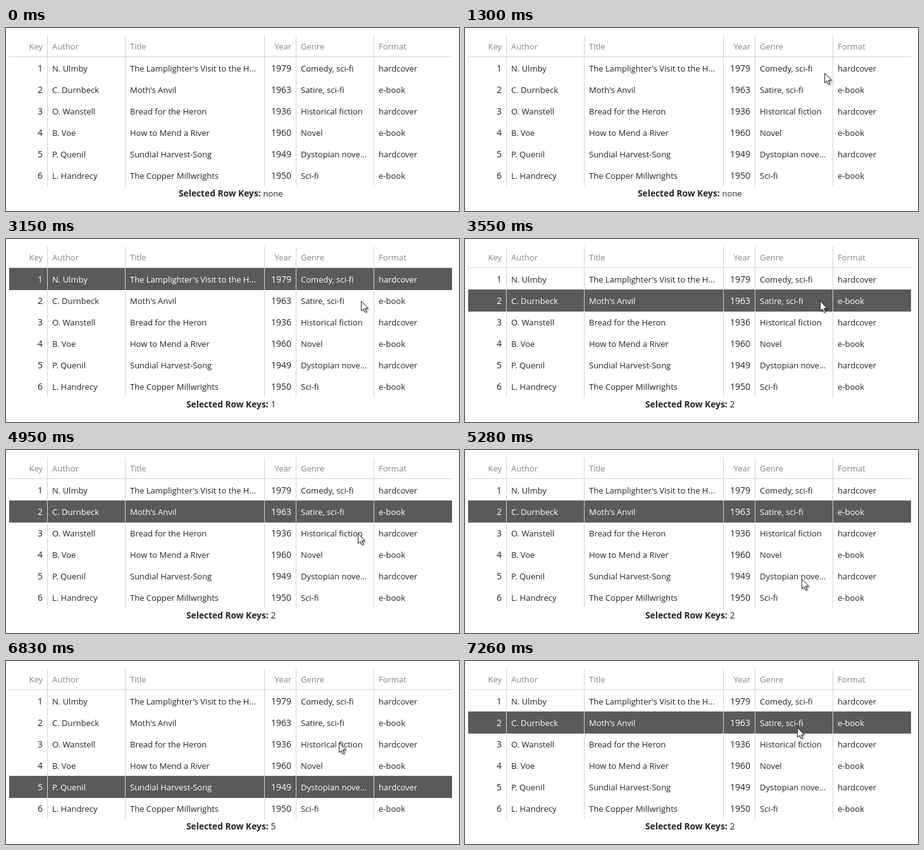
Animation, 716 px wide and 290 px high, one loop 8 s. Source, as an HTML page with a canvas:

```html
<!DOCTYPE html>
<html lang="en">
<head>
<meta charset="utf-8">
<title>Row selection</title>
<style>
  html, body { margin: 0; width: 100%; height: 100%; overflow: hidden; background: #fff; }
  canvas { display: block; width: 716px; height: 290px; }
</style>
</head>
<body>
<canvas id="stage" width="716" height="290"></canvas>
<script>
const ctx = document.getElementById('stage').getContext('2d');
const LOOP = 8000;
const STEP = 30;
const FAMILY = '"Open Sans", "Noto Sans", sans-serif';
const INK = '#222';
const HEAD = '#858589';
const LINE = '#d0d5d3';
const SELECTED = '#5a5a5a';

const TABLE = { left: 5, right: 705, top: 12, headLine: 45, rows: 46, pitch: 34, bottom: 251 };
const DIVIDERS = [65, 188, 408, 458, 581];
const COLUMNS = [
  { name: 'Key', x: 58, align: 'right' },
  { name: 'Author', x: 73 },
  { name: 'Title', x: 196 },
  { name: 'Year', x: 451, align: 'right' },
  { name: 'Genre', x: 466 },
  { name: 'Format', x: 589 }
];
const BOOKS = [
  ['1', 'N. Ulmby', "The Lamplighter's Visit to the H...", '1979', 'Comedy, sci-fi', 'hardcover'],
  ['2', 'C. Durnbeck', "Moth's Anvil", '1963', 'Satire, sci-fi', 'e-book'],
  ['3', 'O. Wanstell', 'Bread for the Heron', '1936', 'Historical fiction', 'hardcover'],
  ['4', 'B. Voe', 'How to Mend a River', '1960', 'Novel', 'e-book'],
  ['5', 'P. Quenil', 'Sundial Harvest-Song', '1949', 'Dystopian nove...', 'hardcover'],
  ['6', 'L. Handrecy', 'The Copper Millwrights', '1950', 'Sci-fi', 'e-book']
];

// [time, selected key]
const CLICKS = [[1760, 1], [3550, 2], [5640, 5], [7260, 2]];

const linear = p => p;
const easeIn = p => p * p;
const easeOut = p => 1 - (1 - p) ** 1.5;
const smooth = p => p * p * (3 - 2 * p);

// Pointer moves: start, end, from, to, easing
const MOVES = [
  [1030, 1300, [683, 93], [568, 71], easeOut],
  [2560, 2590, [568, 71], [567, 72], linear],
  [2590, 2620, [567, 72], [566, 75], linear],
  [2790, 3150, [566, 75], [561, 98], smooth],
  [4420, 4950, [561, 98], [556, 132], easeIn],
  [4950, 5250, [556, 132], [533, 203], easeOut],
  [5250, 5280, [533, 203], [532, 204], linear],
  [6210, 7010, [532, 204], [525, 115], smooth],
  [7040, 7190, [525, 115], [525, 105], linear]
];

const ARROW = [[0.5, 0.5], [0.5, 16], [4, 12.7], [6.5, 18.4], [8.8, 17.4], [6.4, 11.9], [11.4, 11.9]];

function write(text, x, y, color, align = 'left', size = 13, weight = 400) {
  ctx.font = `${weight} ${size}px ${FAMILY}`;
  ctx.textAlign = align;
  ctx.fillStyle = color;
  ctx.fillText(text, x, y);
}

function rect(x, y, w, h, color) {
  ctx.fillStyle = color;
  ctx.fillRect(x, y, w, h);
}

function selectedKey(t) {
  return CLICKS.reduce((key, [time, next]) => t >= time ? next : key, 0);
}

function pointerAt(t) {
  const move = MOVES.filter(m => t >= m[0]).pop();
  if (!move) return null;
  const [start, end, from, to, ease] = move;
  const stepped = t >= end ? end : start + Math.floor((t - start) / STEP) * STEP;
  const p = ease((stepped - start) / (end - start));
  return from.map((v, i) => Math.round(v + (to[i] - v) * p));
}

function drawTable(key) {
  const { left, right, top, headLine, rows, pitch, bottom } = TABLE;
  const width = right - left;
  if (key) rect(left, rows + (key - 1) * pitch, width, pitch + 1, SELECTED);
  rect(left, headLine, width, 1, LINE);
  DIVIDERS.forEach(x => rect(x, top, 1, bottom - top, LINE));

  COLUMNS.forEach((col, c) => {
    write(col.name, col.x, 34, HEAD, col.align);
    BOOKS.forEach((book, r) => {
      const color = r + 1 === key ? '#fff' : INK;
      write(book[c], col.x, 69 + r * pitch, color, col.align, col.align ? 14 : 13);
    });
  });
}

function drawSummary(key) {
  const x = key ? 285 : 273;
  write('Selected Row Keys:', x, 267, INK, 'left', 13.75, 700);
  write(key || 'none', x + 133.5, 267, INK, 'left', key ? 14 : 13);
}

function drawPointer([x, y]) {
  ctx.save();
  ctx.translate(x, y);
  ctx.beginPath();
  ARROW.forEach(([px, py]) => ctx.lineTo(px, py));
  ctx.closePath();
  ctx.shadowColor = 'rgba(0, 0, 0, 0.4)';
  ctx.shadowBlur = 3;
  ctx.shadowOffsetX = 2;
  ctx.shadowOffsetY = 2;
  ctx.fillStyle = '#fff';
  ctx.fill();
  ctx.shadowColor = 'transparent';
  ctx.strokeStyle = '#222';
  ctx.lineWidth = 1;
  ctx.stroke();
  ctx.restore();
}

function draw(t) {
  rect(0, 0, 716, 290, '#fff');
  const key = selectedKey(t);
  drawTable(key);
  drawSummary(key);
  const pointer = pointerAt(t);
  if (pointer) drawPointer(pointer);
}

const began = performance.now();
function tick() {
  draw((performance.now() - began) % LOOP);
  requestAnimationFrame(tick);
}
tick();
</script>
</body>
</html>
```
